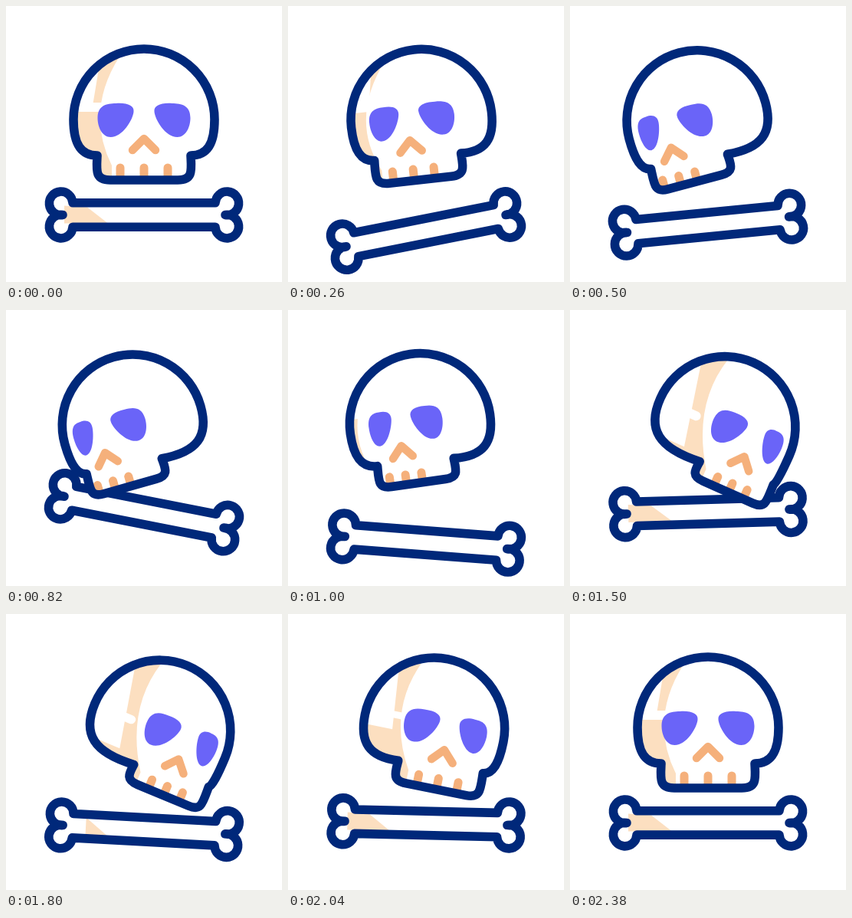
An HTML page with a canvas for the animation above (2.4 s loop, 360 px wide and 360 px high).

```html
<!DOCTYPE html>
<html lang="en">
<head>
<meta charset="utf-8">
<title>Skull and bone</title>
<style>
html, body { margin: 0; height: 100%; overflow: hidden; background: #fff; }
canvas { display: block; width: 100vw; height: 100vh; }
</style>
</head>
<body>
<canvas id="stage" width="360" height="360"></canvas>
<script>
const ctx = document.getElementById('stage').getContext('2d');
const LOOP = 2400, LINE = 11.6, DOME = 92;
const NAVY = '#00287a', VIOLET = '#6a64f8', ORANGE = '#f5b07b', PEACH = '#fcdfc0';

// Each track is a list of [time, value] turning points.
const TURN = [[0, 0], [600, -1], [790, -1], [1510, 1], [1700, 1], [2360, 0], [LOOP, 0]];
const PROFILE = [[0, 0], [600, 1], [1700, 1], [2360, 0], [LOOP, 0]];
const BONE_Y = [[0, 0], [330, 23], [790, -11], [1000, 31], [1480, -9.6], [1800, 8.7], [2150, -2], [LOOP, 0]];
const BONE_TILT = [[0, 0], [330, -12.5], [800, 11.2], [1240, -4.7], [1850, 3.2], [2200, 0], [LOOP, 0]];

const EYE = new Path2D('M-23.5-3C-23.5-19-12.5-22 .5-22C15.5-23 24.5-19 23.5-11' +
  'C22.5-1 9.5 22-6.5 22C-17.5 22-23.5 9-23.5-3Z');
const BONE = new Path2D('M-93-15.7A15.3 15.3 0 1 0-106 0A15.3 15.3 0 1 0-93 15.7' +
  'L93 15.7A15.3 15.3 0 1 0 106 0A15.3 15.3 0 1 0 93-15.7Z');

const clamp = (v, lo, hi) => Math.min(hi, Math.max(lo, v));
const rad = deg => deg * Math.PI / 180;

function valueAt(track, t) {
  const i = track.findIndex(([time], k) => k && t <= time);
  const [t0, a] = track[i - 1], [t1, b] = track[i];
  return a + (b - a) * (1 - Math.cos(Math.PI * (t - t0) / (t1 - t0))) / 2;
}

function fill(path, color) {
  ctx.fillStyle = color;
  ctx.fill(path);
}

function stroke(path, color, width) {
  ctx.strokeStyle = color;
  ctx.lineWidth = width;
  ctx.stroke(path);
}

function polyline(...points) {
  const path = new Path2D();
  points.forEach(p => path.lineTo(...p));
  return path;
}

// Cheek and jaw corner on one side (-1 left, 1 right), from the dome to the chin.
function sidePoints(side, jaw, profile) {
  const notch = jaw + side * (61 - 11 * profile);
  const reach = DOME - side * notch, extra = reach - 31;
  const notchY = 47 + 0.15 * extra, chinY = 79 - 3 * profile;
  return [
    [side * DOME, 0], [side * DOME, 24 + 0.25 * reach],
    [notch + side * 0.7 * reach, notchY + 0.12 * extra], [notch, notchY],
    [notch + side, 67], [notch + side * 3, chinY],
    [jaw + side * (44 - 8.5 * profile), chinY]
  ];
}

function headPath(jaw, profile) {
  const path = new Path2D();
  const follow = p => {
    path.lineTo(...p[0]);
    path.bezierCurveTo(...p[1], ...p[2], ...p[3]);
    path.bezierCurveTo(...p[4], ...p[5], ...p[6]);
  };
  path.arc(0, 0, DOME, Math.PI, 0);
  follow(sidePoints(1, jaw, profile));
  follow(sidePoints(-1, jaw, profile).reverse());
  path.closePath();
  return path;
}

// Shadow on the left of the head, with a highlight cut out of it.
function drawShade(turn, profile) {
  const top = -32 + 8 * turn - 8 * profile, bottom = -42 + 42 * turn;
  const middle = -57 + 30 * turn - 6 * profile;
  const shade = new Path2D();
  shade.moveTo(top, -DOME);
  shade.lineTo(top, -82);
  shade.quadraticCurveTo(2 * middle - (top + bottom) / 2, -11, bottom, 60);
  shade.lineTo(bottom, 80);
  shade.lineTo(-100, 80);
  shade.lineTo(-100, -DOME);
  fill(shade, PEACH);

  const right = Math.max(turn, 0), low = -18 + 63 * right;
  fill(polyline([-100, -72], [-58 - 6 * right, -72], [-67 + 29 * right, low], [-100, low]), '#fff');
  const gap = 12 * (1 - profile * (1 - Math.abs(turn))), gapY = -16 + 18 * turn;
  if (gap > 0) stroke(polyline([-100, gapY], [-40, gapY]), '#fff', gap);
}

function drawSkull(turn, profile) {
  const tilt = 20 * turn + 4 * profile;
  const face = 42 * turn - 3 * profile;
  const head = headPath(1.6 * tilt, profile);
  ctx.save();
  ctx.translate(180, 202);
  ctx.rotate(rad(tilt));
  ctx.translate(0, -54);
  fill(head, '#fff');

  ctx.save();
  ctx.clip(head);
  drawShade(turn, profile);
  for (const i of [-1, 0, 1]) {
    const x = face + i * (31 - 10 * profile);
    stroke(polyline([x, 63], [x, 78]), ORANGE, 11);
  }
  ctx.restore();

  for (const side of [-1, 1]) {
    ctx.save();
    ctx.translate(side * (37 - 6.5 * profile) + 35 * turn, 1 - 1.5 * profile);
    ctx.scale(-side * (1 - 0.24 * profile - 0.18 * side * turn), 1);
    fill(EYE, VIOLET);
    ctx.restore();
  }
  const nose = 15 - 2 * profile;
  stroke(polyline([face - nose, 40], [face, 25], [face + nose, 40]), ORANGE, 10.5);
  stroke(head, NAVY, LINE);
  ctx.restore();
}

function drawBone(y, tilt, turn) {
  const left = -104 + clamp(y * 4, 0, 28);
  ctx.save();
  ctx.translate(180, 272.5 + y);
  ctx.rotate(rad(tilt));
  fill(BONE, '#fff');
  ctx.globalAlpha = clamp(1 + turn * 3, 0, 1);
  fill(polyline([left, -12], [-74, -10], [-47, 11], [left, 11]), PEACH);
  ctx.globalAlpha = 1;
  stroke(BONE, NAVY, LINE);
  ctx.restore();
}

function frame() {
  const t = performance.now() % LOOP;
  const turn = valueAt(TURN, t);
  ctx.fillStyle = '#fff';
  ctx.fillRect(0, 0, 360, 360);
  ctx.lineCap = ctx.lineJoin = 'round';
  drawBone(valueAt(BONE_Y, t), valueAt(BONE_TILT, t), turn);
  drawSkull(turn, valueAt(PROFILE, t));
  requestAnimationFrame(frame);
}
frame();
</script>
</body>
</html>
```
